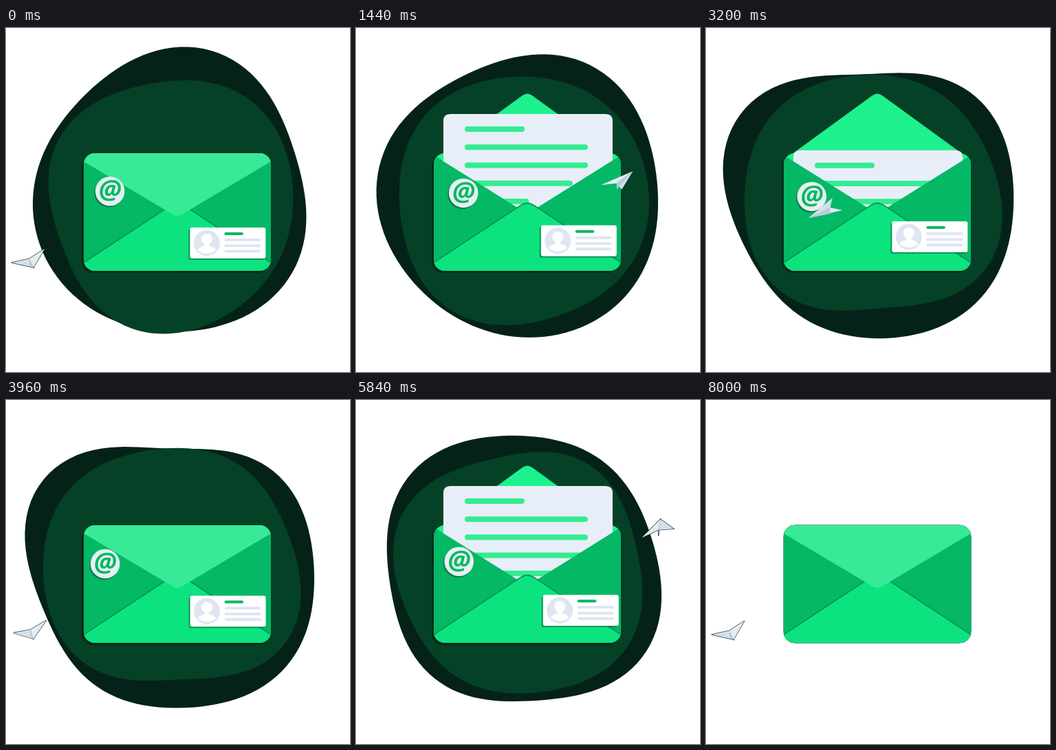
An HTML page for the animation above (8040 ms loop, 500 by 500 pixels).

```html
<!DOCTYPE html>
<html lang="en">
<head>
<meta charset="utf-8">
<title>Envelope</title>
<style>
  html, body { margin: 0; width: 100%; height: 100%; overflow: hidden; background: #fff; }
  svg { display: block; width: 100vw; height: 100vh; }
  .round { fill: none; stroke-linecap: round; }
</style>
</head>
<body>
<svg viewBox="0 0 500 500">
  <defs>
    <clipPath id="body"><rect x="113" y="182" width="272" height="171" rx="16"/></clipPath>
  </defs>

  <!-- thin outlines, seen only where nothing dark lies above them -->
  <rect x="113" y="182" width="272" height="171" rx="16" fill="none" stroke="#0b3a25"/>
  <path id="planeEdge" fill="none" stroke="#26333f" stroke-width="1.4"/>

  <g class="scenery">
    <path id="outer" fill="#052219"/>
    <path id="inner" fill="#054126"/>
    <rect x="110" y="185" width="272" height="171" rx="16" fill="#04291a"/>
  </g>

  <rect x="113" y="182" width="272" height="171" rx="16" fill="#1df18e"/>
  <path id="backFlap" fill="#1df18e"/>

  <g id="letter">
    <path d="M127 266V135Q127 125 137 125H363Q373 125 373 135V266Z" fill="#e8eef8"/>
    <g id="lines" class="round" stroke="#34ec92" stroke-width="8"></g>
  </g>

  <g clip-path="url(#body)">
    <path d="M113 185L249 270L385 185V353H113Z" fill="#04b865"/>
    <path d="M113 341L239 258Q249 251 259 258L385 341V360H113Z" fill="#039553" transform="translate(0 -1)"/>
    <path d="M113 342L239 259Q249 252 259 259L385 342V360H113Z" fill="#0ce37f"/>
    <path id="frontFlap" fill="#38ea98"/>
  </g>

  <g id="badge" class="scenery">
    <circle cx="-1.5" cy="2" r="21.3" fill="#067a48"/>
    <circle r="21.3" fill="#e6eff1"/>
    <text y="11" text-anchor="middle" font-family="'Open Sans', sans-serif" font-size="38" font-weight="700" font-style="italic" fill="#04b865">@</text>
  </g>

  <g id="card" class="scenery">
    <rect x="-2" y="2" width="110" height="45" rx="3" fill="#05633a" opacity=".6"/>
    <rect width="110" height="45" rx="3" fill="#fff"/>
    <circle cx="24.5" cy="22.5" r="19" fill="#dfe5f3"/>
    <circle cx="24.5" cy="17" r="8" fill="#fff"/>
    <path d="M21 22H28V27Q36 28 37.5 33Q32 38 24.5 38Q17 38 11.5 33Q13 28 21 27Z" fill="#fff"/>
    <path class="round" d="M52 9H75.5" stroke="#04b865" stroke-width="4"/>
    <path class="round" d="M52 18H101M52 26.5H101M52 34.5H101" stroke="#dfe5f3" stroke-width="4"/>
  </g>

  <path id="wingR" fill="#d3e0eb"/>
  <path id="wingL" fill="#e3edf1"/>
  <path id="keel" fill="#b9cbdb"/>
</svg>

<script>
const LOOP = 8040, PERIOD = 8000, HALF = 4000, STEP = 40, LINES = 5;
const { sin, cos, PI } = Math;
const $ = id => document.getElementById(id);
const shape = (id, d) => $(id).setAttribute('d', d);
const place = (id, x, y) => $(id).setAttribute('transform', `translate(${x} ${y})`);
const ramp = (t, from, to) => {
  const v = Math.max(0, Math.min(1, (t - from) / (to - from)));
  return v * v * (3 - 2 * v);
};

// Radius at angle a and loop phase p: standing bulges plus waves running round.
const outerRadius = (a, p) => 203 + 2.8 * cos(p - 2)
  + 4.3 * cos(2 * a - 1.05) + 5.6 * cos(2 * a - p + 2.58) + 2.9 * cos(2 * a + p + 2.34)
  + 2.3 * cos(3 * a + 2.92) + 6.7 * cos(3 * a - p - 2.04) + 1.8 * cos(3 * a + p - 1.27)
  + 4.4 * cos(4 * a - 2.45) + 4 * cos(4 * a + 0.17) * cos(p - 0.48);

const innerRadius = (a, p) => 181.5 + 1.7 * sin(p)
  + 2.7 * cos(2 * a - 0.41) + 4.3 * cos(2 * a - p + 2.8) + 2 * cos(2 * a + p + 2.91)
  + 5 * cos(3 * a - p + 1.35) + 1.4 * cos(3 * a + p + 2.38)
  + 4.5 * cos(4 * a - 2.29) + 1.6 * cos(4 * a + p);

function drawBlob(id, radius, p, cx, cy) {
  const count = 120;
  const points = Array.from({ length: count }, (_, i) => {
    const a = i / count * 2 * PI, r = radius(a, p);
    return `${(cx + r * cos(a)).toFixed(2)} ${(cy + r * sin(a)).toFixed(2)}`;
  });
  shape(id, 'M' + points.join('L') + 'Z');
}

function drawFloating(p) {
  drawBlob('outer', outerRadius, p, 241.5, 246.5 - 4.3 * cos(p));
  drawBlob('inner', innerRadius, p, 240 + cos(p - 0.9), 249.5 + 5.4 * cos(p + 0.36));
  place('badge',
    151.5 + 5.6 * cos(p - 0.85) + 5.9 * cos(2 * p + 2.34),
    237.4 + 6 * cos(p - 1.84) + 2.9 * cos(3 * p - 1.05));
  place('card',
    268.6 + 2.2 * sin(3 * p) - 1.2 * cos(2 * p),
    285.1 + 2.7 * cos(p) + 3.5 * cos(2 * p - 0.87));
}

const lines = Array.from({ length: LINES }, () =>
  $('lines').appendChild(document.createElementNS('http://www.w3.org/2000/svg', 'path')));

function drawEnvelope(t) {
  const turn = ramp(t, 40, 420) - ramp(t, 3500, 3960);
  const fold = cos(turn * PI), closed = fold > 0;
  const base = closed ? 194 : 187.5, left = closed ? 113 : 119;
  const tip = closed ? 192 + 83 * fold : 186 + 93 * fold;
  const near = tip - 7 * (tip - base) / (249 - left);
  const sides = `M${left} ${base}L242 ${near}Q249 ${tip} 256 ${near}L${498 - left} ${base}`;
  shape('frontFlap', closed ? sides + 'V180H113Z' : '');
  shape('backFlap', closed ? '' : sides + 'Z');

  place('letter', 0, 78 * (1 - ramp(t, 440, 1010) + ramp(t, 2930, 3365)));
  lines.forEach((line, i) => {
    const start = 800 + i * 110, y = 147 + i * 26.25;
    const length = (i ? 171 : 79) * ramp(t, start, start + 400);
    shape.call(null, line.id = 'line' + i, length ? `M162 ${y}h${length}` : '');
  });
}

// The plane circles on a tilted orbit; its axes turn with the orbit angle q.
function drawPlane(q) {
  const tail = [237 - 205 * cos(q) - 11 * sin(q) - 12 * sin(2 * q), 258 + 73 * cos(q) + 26 * sin(q)];
  const ahead = [48 * sin(q + 0.17), 17 * cos(q) - 16 * sin(q)];
  const side = [48 * cos(q), -20 * cos(q) - 25 * sin(q)];
  const point = (forward, sideways, down = 0) =>
    (tail[0] + forward * ahead[0] + sideways * side[0]) + ' ' +
    (tail[1] + forward * ahead[1] + sideways * side[1] + down);
  const nose = point(1, 0), crease = point(0.25, 0);
  const facets = {
    wingL: [nose, point(0, 0.5), crease],
    wingR: [nose, point(0, -0.5), crease],
    keel: [nose, crease, point(0.25, 0, 9)]
  };
  let edge = '';
  for (const id in facets) {
    const d = 'M' + facets[id].join('L') + 'Z';
    shape(id, d);
    edge += d;
  }
  shape('planeEdge', edge);
}

function render(ms) {
  const t = Math.floor((ms % LOOP) / STEP) * STEP;
  const bare = t >= PERIOD;
  document.querySelectorAll('.scenery').forEach(el => { el.style.display = bare ? 'none' : ''; });
  drawFloating(t / PERIOD * 2 * PI);
  drawEnvelope(t % HALF);
  drawPlane(t / HALF * 2 * PI);
}

const began = performance.now();
function tick() {
  render(performance.now() - began);
  requestAnimationFrame(tick);
}
tick();
</script>
</body>
</html>
```
